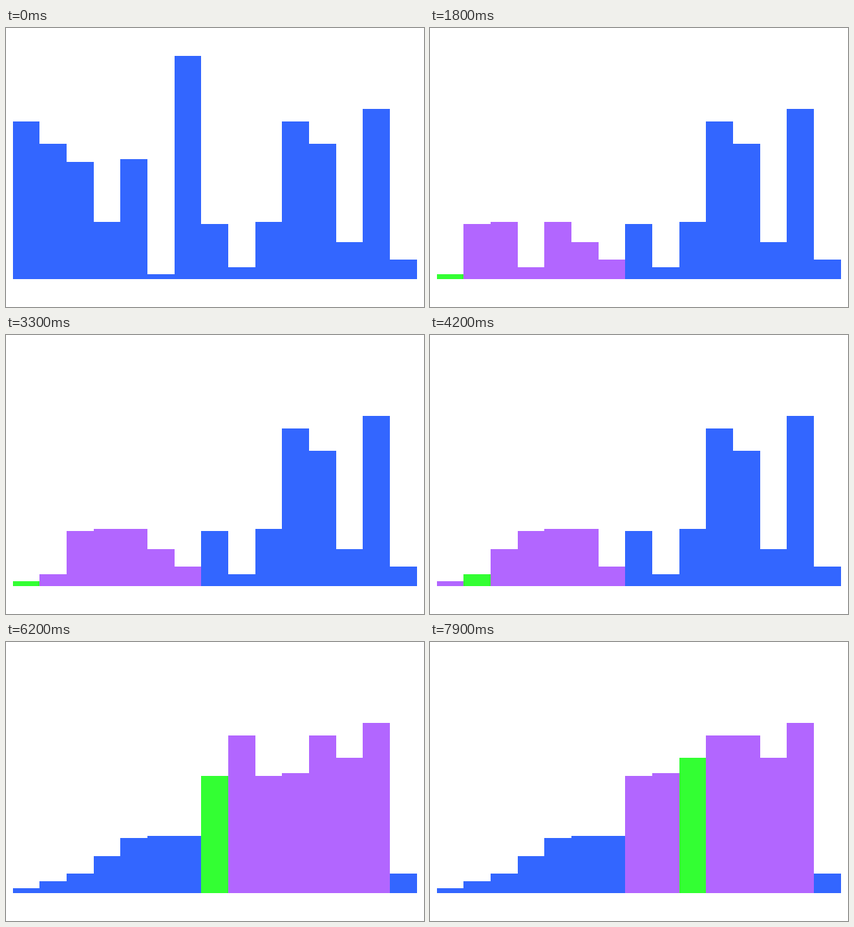
An HTML page that plays this animation: 600x400 px, repeating every 8000 ms.

```html
<!DOCTYPE html>
<html lang="en">
<head>
<meta charset="utf-8">
<title>Bucket sort</title>
<style>
  html, body { margin: 0; width: 100%; height: 100%; overflow: hidden; background: #fff; }
  svg { display: block; width: 600px; height: 400px; }
</style>
</head>
<body>
<svg id="stage" viewBox="0 0 600 400" shape-rendering="crispEdges"></svg>
<script>
const BLUE = '#3366ff', PURPLE = '#b266ff', GREEN = '#33ff33';
const FRAME_MS = 100, FRAMES = 80, BASE = 360;
const values = [226, 194, 168, 82, 172, 7, 320, 79, 17, 82, 226, 194, 53, 244, 28];
const count = values.length;
const ascending = (a, b) => a - b;

// Two ticks per picture; every written element takes two ticks.
const buckets = [
  { start: 7, first: 0, items: values.filter(v => v < 160) },
  { start: 110, first: 7, items: values.filter(v => v >= 160 && v < 320) }
];

const edge = i => Math.floor(10 + i * 580 / count);
const stage = document.getElementById('stage');
const bars = values.map((_, i) => {
  const bar = document.createElementNS('http://www.w3.org/2000/svg', 'rect');
  bar.setAttribute('x', edge(i));
  bar.setAttribute('width', edge(i + 1) - edge(i));
  return stage.appendChild(bar);
});

// Each pass rewrites the bucket with one more element inserted in order.
function passItems(items, pass) {
  const sorted = Math.min(pass + 2, items.length);
  return [...items.slice(0, sorted).sort(ascending), ...items.slice(sorted)];
}

function passStart(bucket, pass) {
  return bucket.start + (pass ? 15 * pass - 1 : 0);
}

function stateAt(tick) {
  const heights = values.slice();
  const state = { heights, from: 0, to: 0, cursor: -1 };
  if (tick > 0 && tick < buckets[0].start) {
    state.to = count;
    state.cursor = Math.floor(tick * 2.5) - 1;
  }
  for (const bucket of buckets) {
    const { start, first, items } = bucket;
    if (tick < start) break;
    state.from = first;
    state.to = first + items.length;
    for (let pass = 0; pass < items.length; pass++) {
      const step = Math.floor((tick - passStart(bucket, pass)) / 2);
      if (step < 0) break;
      passItems(items, pass).slice(0, step + 1).forEach((v, k) => { heights[first + k] = v; });
      state.cursor = step < items.length ? first + step : -1;
    }
  }
  return state;
}

function draw(frame) {
  const { heights, from, to, cursor } = stateAt(frame * 2);
  bars.forEach((bar, i) => {
    bar.setAttribute('y', BASE - heights[i]);
    bar.setAttribute('height', heights[i]);
    bar.setAttribute('fill', i === cursor ? GREEN : i >= from && i < to ? PURPLE : BLUE);
  });
}

const began = performance.now();
function tick() {
  draw(Math.floor((performance.now() - began) / FRAME_MS) % FRAMES);
  requestAnimationFrame(tick);
}
tick();
</script>
</body>
</html>
```
